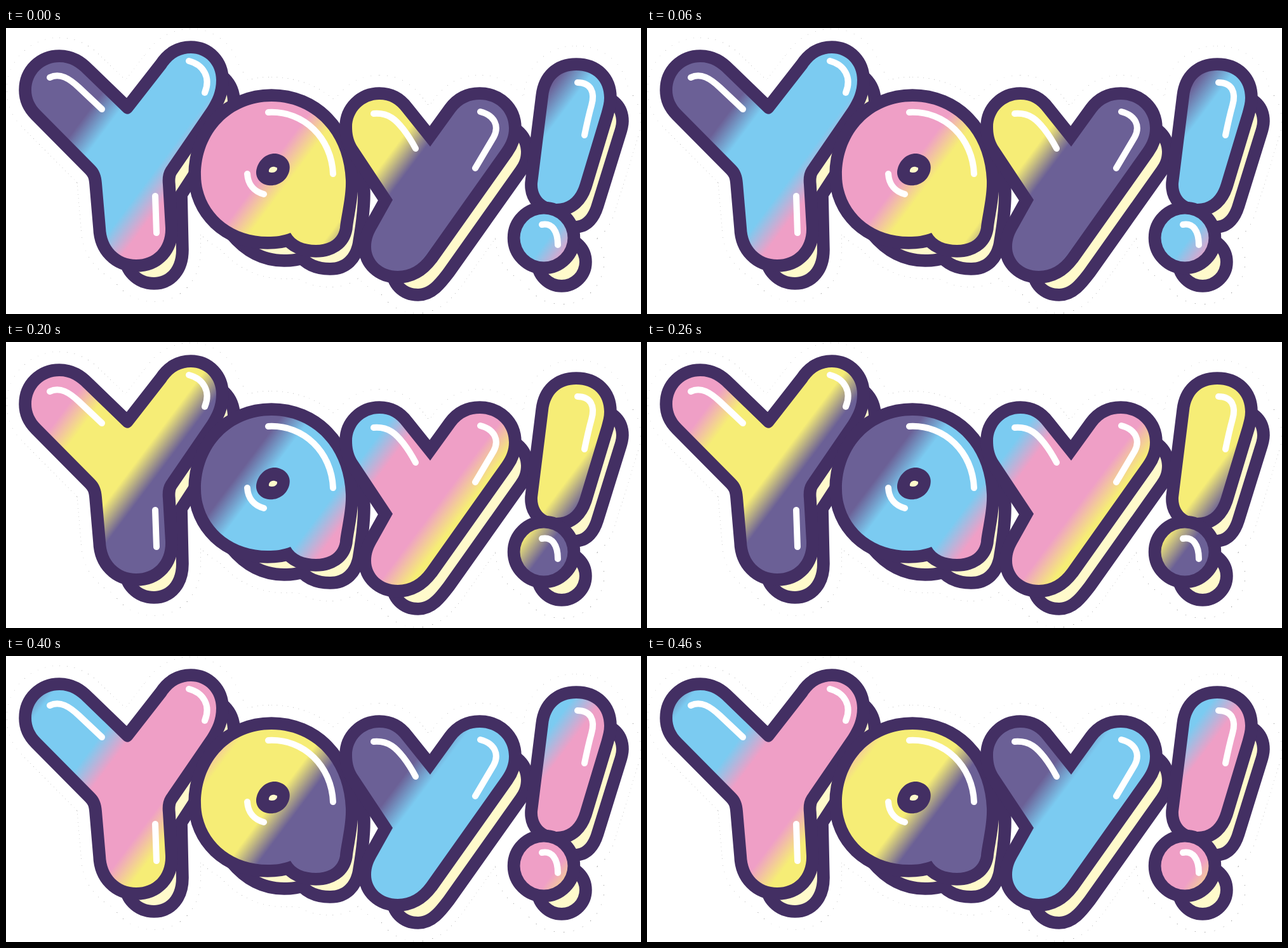
Recreate the animation shown at these times as an HTML page. Size 1000x451 px, loop 500 ms.

```html
<!DOCTYPE html>
<html lang="en">
<head>
<meta charset="utf-8">
<title>Yay!</title>
<style>
  html, body { margin: 0; width: 100%; height: 100%; overflow: hidden; background: #fff; }
  svg { display: block; width: 100%; height: 100%; }
  .shape { stroke: #432f63; stroke-width: 39.5; stroke-linejoin: round; paint-order: stroke; }
  .shine { fill: none; stroke: #fff; stroke-width: 10; stroke-linecap: round; stroke-linejoin: round; }
  .specks { fill: none; stroke: #555; stroke-width: 78; stroke-dasharray: .5 6; }
  .halo { fill: #fff; stroke: #fff; stroke-width: 77; stroke-linejoin: round; }
</style>
</head>
<body>
<svg viewBox="0 0 1000 451" role="img" aria-label="Yay!">
  <defs>
    <linearGradient id="bands" gradientUnits="userSpaceOnUse" spreadMethod="repeat" x1="0" y1="0" x2="448" y2="336"></linearGradient>
  </defs>
  <g id="art"></g>
</svg>
<script>
const NS = 'http://www.w3.org/2000/svg';
const art = document.getElementById('art');
const bands = document.getElementById('bands');
const blue = '#7bcbf1', pink = '#ef9fc6', yellow = '#f6ed76', purple = '#6b6096';
const ink = '#432f63', cream = '#fffacb';

const letters = [
  'M84 54C101 54 112 62 122 72L184 132Q192 140 199 131L252 63C262 47 276 40 291 40C314 40 331 58 331 82C331 100 325 112 317 125L252 220C247 228 246 237 247 247L251 315C252 345 233 365 205 365C178 365 158 345 157 315L151 245C150 232 147 224 139 216L54 130C45 121 40 110 40 98C40 72 60 54 84 54Z',
  'M418 116C482 116 532 165 535 240C536 265 527 300 526 315C523 333 508 342 488 342C470 342 455 336 448 323C435 328 425 329 412 329C350 329 307 285 307 232C307 165 355 116 418 116Z',
  'M588 113C604 113 615 120 624 132L668 187L707 133C718 118 732 113 746 113C772 113 792 132 792 158C792 170 788 180 781 190L662 358C650 374 636 383 617 383C592 383 575 366 575 345C575 333 579 324 585 314L609 271L552 185C547 176 545 167 545 156C545 132 564 113 588 113Z',
  'M898 67C925 67 942 84 942 110C942 118 940 124 938 132L904 245C898 265 886 277 867 277C848 277 836 264 837 245L854 108C857 82 873 67 898 67Z',
  circle(847, 331, 37.5)
];

const shadows = [
  'M308 75C332 75 349 93 349 116C349 130 343 141 335 154L266 260L268 350C268 376 254 393 233 393C212 393 197 377 197 357L215 220Z',
  'M530 200C549 215 554 240 554 262C554 290 549 320 546 338C542 358 530 370 511 370C493 370 479 365 470 352C458 356 450 357 438 357C405 357 380 340 362 318L400 200Z',
  'M777 162C797 162 811 177 811 195C811 205 808 212 803 219L689 380C676 397 665 411 649 411C630 411 618 398 618 380L730 190C740 172 757 162 777 162Z',
  'M933 118C950 118 961 130 961 147C961 153 959 159 957 165L922 278C917 294 909 304 896 304L870 290L900 130Z',
  circle(875, 369, 28)
];

const counter = 'M425 198C440 200 450 212 446 226C442 241 428 250 413 248C399 246 391 234 395 221C399 207 411 197 425 198Z';
const hole = 'M414 227C413 221 419 216 427 220.500C428 226 421 230 414 227Z';

const shines = [
  'M69 78C85 70 100 80 115 94L151 128',
  'M288 52C311 58 323 78 313 102',
  'M235 265L237 323',
  'M413 133C470 130 513 175 515 230',
  'M380 230C381 247 391 258 406 262',
  'M579 135C603 133 615 146 626 160Q636 173 645 190',
  'M747 132C770 138 777 155 768 172L739 221',
  'M900 86C921 86 928 101 922 122Q917 140 911 169',
  'M844 310C860 307 869 320 869 342'
];

function circle(x, y, r) {
  return `M${x - r} ${y}a${r} ${r} 0 1 1 ${2 * r} 0a${r} ${r} 0 1 1 ${-2 * r} 0Z`;
}

function add(parent, tag, attrs) {
  const el = document.createElementNS(NS, tag);
  for (const key in attrs) el.setAttribute(key, attrs[key]);
  return parent.appendChild(el);
}

function drawAll(paths, attrs) {
  paths.forEach(d => add(art, 'path', { d, ...attrs }));
}

// Four solid bands with soft joins; the first band wraps around the ends.
[blue, pink, yellow, purple, blue].forEach((color, i) => {
  for (const side of [-0.09, 0.09]) {
    const offset = Math.min(1, Math.max(0, i / 4 + side));
    add(bands, 'stop', { offset, 'stop-color': color });
  }
});

const outlines = [...shadows, ...letters];
drawAll(outlines, { class: 'specks' });
drawAll(outlines, { class: 'halo' });
drawAll(shadows, { class: 'shape', fill: cream });
drawAll(letters, { class: 'shape', fill: 'url(#bands)' });
drawAll([counter], { fill: ink });
drawAll([hole], { fill: cream });
drawAll(shines, { class: 'shine' });

// Distance of the purple-to-blue join along the band direction, per step.
const joins = [202, 292, 437, 556, 634];
const STEP = 100, HALF_BAND = 70;
let shown = -1;

function update(ms) {
  const step = Math.floor(ms / STEP) % joins.length;
  if (step === shown) return;
  shown = step;
  const s = joins[step] + HALF_BAND;
  bands.setAttribute('gradientTransform', `translate(${s * 0.8} ${s * 0.6})`);
}

const start = performance.now();
function tick() {
  update(performance.now() - start);
  requestAnimationFrame(tick);
}
tick();
</script>
</body>
</html>
```
